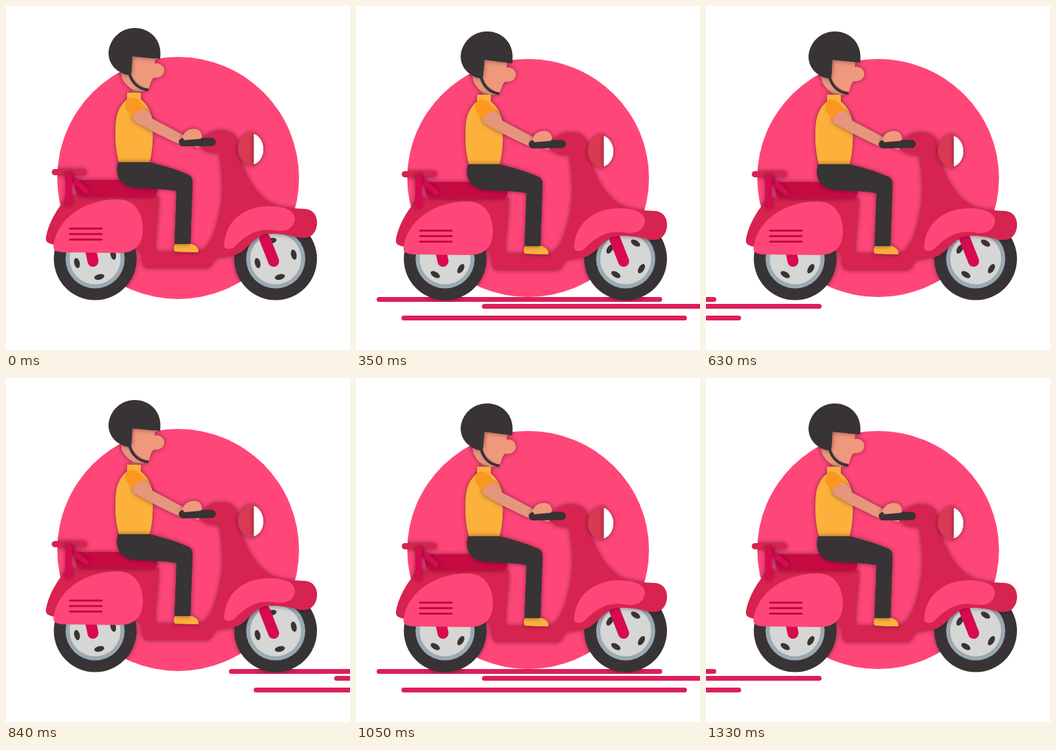
An HTML page with a canvas for the animation above (1400 ms loop, 500x500 px).

```html
<!DOCTYPE html>
<html lang="en">
<head>
<meta charset="utf-8">
<title>Scooter ride</title>
<style>
  html, body { margin: 0; width: 100%; height: 100%; overflow: hidden; background: #fff; }
  canvas { display: block; width: 500px; height: 500px; }
</style>
</head>
<body>
<canvas id="stage" width="500" height="500"></canvas>
<script>
const ctx = document.getElementById('stage').getContext('2d');
const STEP = 70, STEPS = 10;

const PINK = '#ff4678', RED = '#d7234f', CRIMSON = '#d80a50', SEAT = '#c60a42';
const DARK = '#383334', SKIN = '#f0987c', SHADE = '#e5967d', YELLOW = '#fcb13b';

const shapes = {
  chassis: `M58 338 C60 320 73 294 91 276 L222 276 C222 305 217 330 217 357 L280 357
    C296 355 307 326 313 288 C317 260 313 235 310 213 C298 215 284 210 283 203
    C283 190 297 181 312 181 C326 181 338 187 337 202 C341 236 362 280 393 290
    C412 295 425 294 436 295 C449 297 453 308 452 318 C450 333 441 338 428 337
    C410 332 395 330 380 331 C357 334 350 359 331 362 C322 364 314 365 305 366
    C301 370 300 381 290 381
    L207 381 C198 381 197 372 197 360 L190 350 L70 347 C61 345 58 343 58 338Z`,
  rearPanel: `M69 349 C73 310 113 281 162 281 C190 281 199 304 199 326
    C198 348 187 359 164 359 L82 358 C73 357 69 355 69 349Z`,
  frontPanel: `M317 349 C318 313 345 292 380 291 C407 290 421 299 420 310
    C418 326 402 329 390 326 C362 322 346 336 331 351 C325 354 318 354 317 349Z`,
  seat: 'M104 253 L200 253 L220 266 C220 274 217 277 211 277 L110 277 C99 277 99 255 104 253Z',
  lampBack: 'M360.5 183 L360.5 233 C347 232 337 221 337 208 C337 195 347 184 360.5 183Z',
  lampGlass: 'M360.5 186 C369 189 374 199 374 208 C374 218 369 227 360.5 230Z',
  torso: `M176 126 L196 126 L196 136 C207 145 214 158 213 176 C214 198 212 215 208 229
    L165 229 C159 210 158 188 160 166 C162 153 167 143 176 136Z`,
  trousers: `M163 227 L207 227 C222 230 246 237 264 245 C270 247 271 251 271 258
    L268 346 L245 346 L248 269 C229 265 208 266 185 264 C164 260 158 244 163 227Z`,
  shoe: 'M246 346 C255 344 265 344 270 346 C278 349 281 354 279 358 L246 357 C243 354 244 349 246 346Z',
  forearm: 'M190 150 C198 146 207 150 213 164 L262 190 L253 201 C230 191 207 179 188 168 C181 163 185 154 190 150Z',
  sleeve: 'M176 135 C185 130 192 134 204 150 C195 149 188 153 186 161 C177 156 169 147 176 135Z',
  hand: 'M256 191 C260 182 266 178 276 179 C283 181 286 187 284 193 L280 206 L273 204 L268 195 L257 195Z',
  knuckles: 'M257 191 C261 180 273 176 281 181 C285 185 285 190 283 193 L259 195Z',
  jaw: 'M167 94 L184 94 L207 122 C196 125 188 124 182 120 C172 113 167 105 167 94Z',
  face: `M184 72 L217 75 L216 84 C224 82 230 88 230 94 C229 102 222 105 215 104
    C210 107 210 115 207 120 C195 117 184 108 182 96Z`,
  helmet: `M184 73 L224 77 C228 51 211 32 187 32 C166 32 149 49 149 70
    C150 86 162 97 177 100 L182 98Z`,
  strap: 'M179 97 C183 112 193 121 207 122'
};
for (const name in shapes) shapes[name] = new Path2D(shapes[name]);

// Shadows fall only on pixels that are already painted.
function castShadow(draw) {
  ctx.save();
  ctx.globalCompositeOperation = 'source-atop';
  ctx.shadowColor = 'rgba(40,0,20,.55)';
  ctx.shadowBlur = 7;
  draw();
  ctx.restore();
}

function fill(path, color, shadow = false) {
  ctx.fillStyle = color;
  if (shadow) castShadow(() => ctx.fill(path));
  ctx.fill(path);
}

function bar(x1, y1, x2, y2, width, color, shadow = false) {
  const path = new Path2D();
  path.moveTo(x1, y1);
  path.lineTo(x2, y2);
  ctx.strokeStyle = color;
  ctx.lineWidth = width;
  ctx.lineCap = 'round';
  if (shadow) castShadow(() => ctx.stroke(path));
  ctx.stroke(path);
}

function oval(x, y, rx, ry, color, shadow = false) {
  const path = new Path2D();
  path.ellipse(x, y, rx, ry, 0, 0, Math.PI * 2);
  fill(path, color, shadow);
}

function wheel(x, turn) {
  ctx.save();
  ctx.translate(x, 367.5);
  oval(0, 0, 60, 60, DARK, true);
  oval(0, 0, 43, 43, '#9aa9b2');
  oval(0, 0, 37, 37, '#d6d6d4');
  ctx.rotate(turn);
  for (let i = 0; i < 4; i++) {
    oval(27, 0, 4, 7.5, DARK);
    ctx.rotate(Math.PI / 2);
  }
  ctx.restore();
}

// Road streaks rush in, slow down mid-way and rush out.
function streaks(n) {
  const m = n - 5;
  const shift = 80.13 * m - 0.47 * m * m + 1.829 * m ** 3;
  for (const [x, y] of [[30, 426.5], [183, 436.5], [66, 453.5]])
    bar(x + 3.5 - shift, y, x + 411.5 - shift, y, 7, '#dc1f58');
}

function headTilt(n) {
  const keys = [[0, 0], [2, 0], [5, 1.7], [7, -2.2], [9, 0], [10, 0]];
  const i = keys.findIndex(k => k[0] > n);
  const [t0, a0] = keys[i - 1], [t1, a1] = keys[i];
  return (a0 + (a1 - a0) * (n - t0) / (t1 - t0)) * Math.PI / 180;
}

function scooter() {
  bar(71, 241.5, 113, 241.5, 9, RED, true);
  fill(shapes.chassis, RED, true);
  fill(shapes.seat, SEAT, true);
  bar(92, 247, 116, 268, 8, CRIMSON, true);
  bar(91, 247, 91, 287, 9, CRIMSON, true);
  fill(shapes.rearPanel, PINK);
  fill(shapes.frontPanel, PINK);
  for (const y of [323.5, 331.5, 339.5]) bar(93, y, 139, y, 3, SEAT);
  fill(shapes.lampBack, '#d93951', true);
  fill(shapes.lampGlass, '#fff', true);
}

function head(n, bob) {
  ctx.save();
  ctx.translate(187, 175 + bob);
  ctx.rotate(headTilt(n));
  ctx.translate(-187, -175);
  fill(shapes.jaw, SHADE, true);
  fill(shapes.face, SKIN, true);
  fill(shapes.helmet, DARK, true);
  ctx.strokeStyle = DARK;
  ctx.lineWidth = 4;
  ctx.lineCap = 'butt';
  ctx.stroke(shapes.strap);
  ctx.restore();
}

function rider(n, bob) {
  fill(shapes.shoe, YELLOW, true);
  bar(188, 119, 188, 127, 9, '#d9886f');
  head(n, bob);
  fill(shapes.torso, YELLOW, true);
  fill(shapes.trousers, DARK, true);
  fill(shapes.forearm, SHADE, true);
  fill(shapes.sleeve, '#fb9722');
  fill(shapes.hand, SKIN, true);
  bar(257, 198, 299, 197.5, 12, DARK);
  fill(shapes.knuckles, SKIN);
}

function render(n) {
  const low = n % 2;
  const turn = (77 + 45 * n) * Math.PI / 180;
  ctx.clearRect(0, 0, 500, 500);
  oval(250.2, 250, 175.7, low ? 173 : 176, PINK);
  streaks(n);
  wheel(129.5, turn);
  wheel(392, turn);
  bar(121, 345, 126.5, 371, 16, CRIMSON);
  bar(376, 338, 389, 371, 16, CRIMSON);
  ctx.save();
  ctx.translate(0, low * 3);
  scooter();
  rider(n, low * 2);
  ctx.restore();
}

const start = performance.now();
function tick() {
  const elapsed = performance.now() - start;
  render(Math.floor(elapsed / STEP) % STEPS);
  requestAnimationFrame(tick);
}
tick();
</script>
</body>
</html>
```
